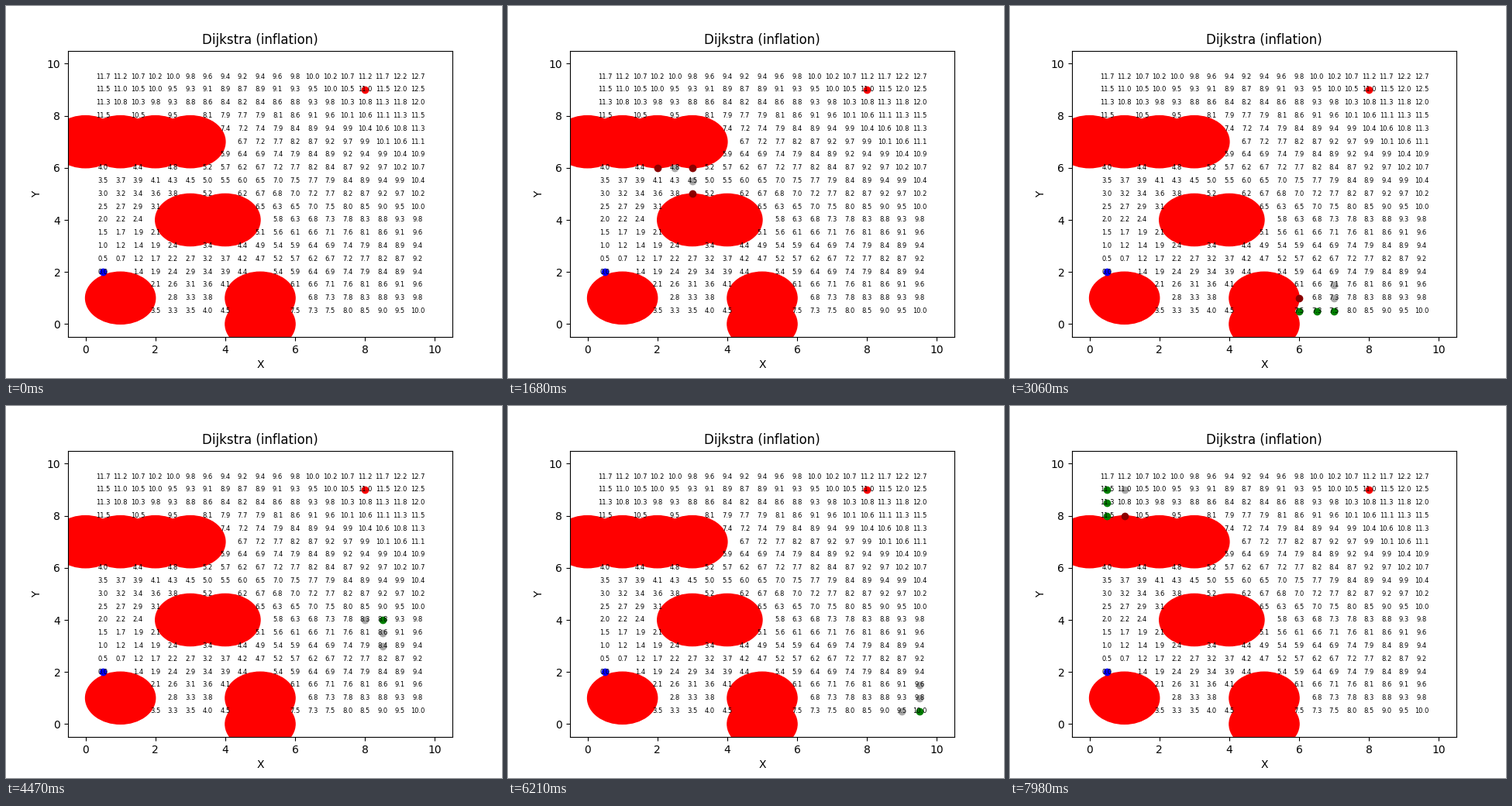
A matplotlib script for the animation above (8000 ms loop, 640x480 px).

```python
import math

import matplotlib.pyplot as plt
import numpy as np
from matplotlib.animation import FuncAnimation

FRAMES = 267
LOOP_MS = 8000

# Grid cells are counted in half units
SIZE = 20
START = (1, 4)
GOAL = (16, 18)
OBSTACLES = [(0, 7), (1, 7), (2, 7), (3, 7), (3, 4), (4, 4), (1, 1), (5, 1), (5, 0)]
MOVES = [(1, 0), (0, 1), (-1, 0), (0, -1), (-1, -1), (-1, 1), (1, -1), (1, 1)]
COLORS = {"blocked": "darkred", "open": "darkgray", "new": "green"}


def is_blocked(cell):
    x, y = cell
    if not (0 < x < SIZE and 0 < y < SIZE):
        return True
    return any((x - 2 * ox) ** 2 + (y - 2 * oy) ** 2 <= 4 for ox, oy in OBSTACLES)


def search():
    """Expand every reachable cell; return final costs and each step's neighbours."""
    frontier, closed, steps = {START: 0.0}, {}, []
    while frontier:
        cell = min(frontier, key=frontier.get)
        cost = closed[cell] = frontier.pop(cell)
        step = {kind: [] for kind in COLORS}
        for dx, dy in MOVES:
            near = (cell[0] + dx, cell[1] + dy)
            if near in closed:
                continue
            if is_blocked(near):
                step["blocked"].append(near)
                continue
            step["open" if near in frontier else "new"].append(near)
            total = cost + (math.sqrt(0.5) if dx and dy else 0.5)
            if total < frontier.get(near, math.inf):
                frontier[near] = total
        steps.append(step)
    return closed, steps


def set_limits(ax):
    ax.set_xlim(-0.5, 10.5)
    ax.set_ylim(-0.5, 10.5)


def label_layer(fig, ax, costs):
    """Render the cost labels once as black ink on a transparent layer."""
    ax.set_axis_off()
    labels = [
        ax.text(x / 2, y / 2, f"{cost:.1f}", fontsize=6, ha="center", va="center")
        for (x, y), cost in costs.items()
    ]
    fig.canvas.draw()
    page = np.array(fig.canvas.buffer_rgba())
    layer = np.zeros_like(page)
    layer[..., 3] = 255 - page[..., 0]
    for label in labels:
        label.remove()
    ax.set_axis_on()
    return layer


costs, steps = search()

fig, ax = plt.subplots(figsize=(6.4, 4.8), dpi=100, facecolor="white")
set_limits(ax)
fig.figimage(label_layer(fig, ax, costs), zorder=5)

ax.set_title("Dijkstra (inflation)")
ax.set_xlabel("X")
ax.set_ylabel("Y")
for center in OBSTACLES:
    ax.add_patch(plt.Circle(center, 1, color="red"))
ax.plot(START[0] / 2, START[1] / 2, "o", color="blue")
ax.plot(GOAL[0] / 2, GOAL[1] / 2, "o", color="red")
dots = {kind: ax.plot([], [], "o", color=color)[0] for kind, color in COLORS.items()}
set_limits(ax)


def update(frame):
    for kind, line in dots.items():
        cells = steps[frame - 1][kind] if frame else []
        line.set_data([x / 2 for x, _ in cells], [y / 2 for _, y in cells])
    return list(dots.values())


anim = FuncAnimation(
    fig, update, frames=FRAMES, interval=LOOP_MS / FRAMES, repeat=True, repeat_delay=0, blit=False
)
plt.show()
```
